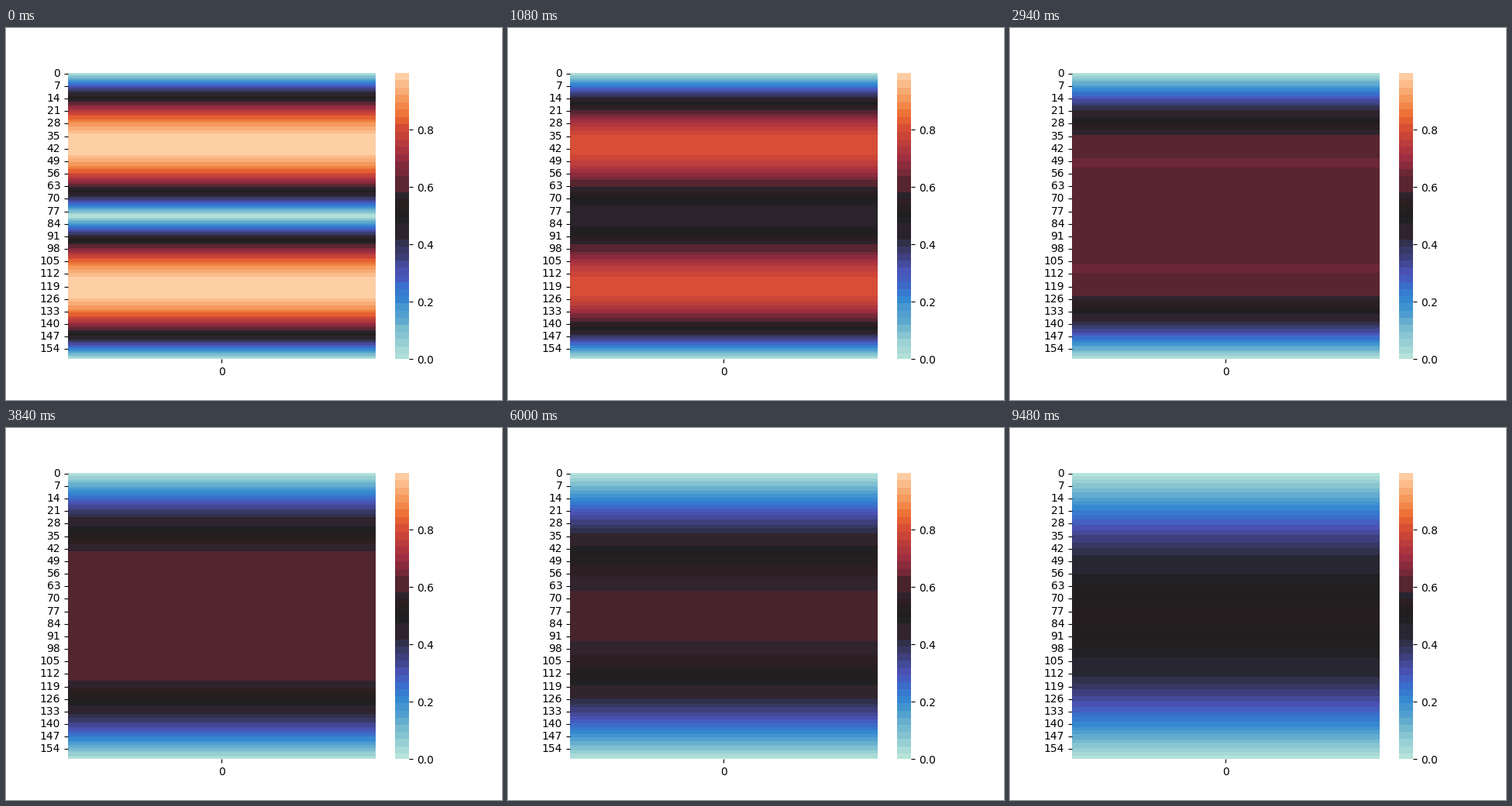
Animation of 640 by 480 pixels, one loop 9600 ms. Source, as a matplotlib script:

```python
import numpy as np
import matplotlib.pyplot as plt
from matplotlib.animation import FuncAnimation
from matplotlib.colors import BoundaryNorm, LinearSegmentedColormap, ListedColormap

CELLS, FRAMES, INTERVAL = 160, 160, 60
SUBSTEPS, RATE = 16, 0.486
ROW_WEIGHT = 50  # pixels of one heatmap row per pixel row of the bar

ICE_FIRE = LinearSegmentedColormap.from_list("ice_fire", [
    (0, "#bde7db"), (0.1, "#7abccf"), (0.2, "#348bd0"), (0.25, "#3871cf"),
    (0.3, "#4b53b7"), (0.4, "#333250"), (0.45, "#25252e"), (0.5, "#1f1e1e"),
    (0.55, "#2b1f22"), (0.6, "#4d242e"), (0.7, "#9c2d42"), (0.8, "#d54a36"),
    (0.85, "#ec6c30"), (0.9, "#f49354"), (1, "#ffd4ac")], N=1024)

# Even bands on the cold side, in the dark middle and on the hot side
EDGES = np.concatenate([[0], np.linspace(0.02, 0.418, 17),
                        np.linspace(0.474, 0.582, 6), np.linspace(0.638, 1, 15)])
BANDS = len(EDGES) - 1
MIDS = (EDGES[:-1] + EDGES[1:]) / 2


def band(values):
    return np.digitize(values, EDGES[1:-1])


# These two dark bands share one colour
COLD_DARK, HOT_DARK = band(0.45), band(0.57)


def palette(u):
    """Give each band the mean colour of the pixels that fall in it."""
    bar_values = np.linspace(0, 1, 370)
    values = np.concatenate([u, bar_values])
    weights = np.repeat([ROW_WEIGHT, 1], [len(u), len(bar_values)])
    index = band(values)
    index[index == HOT_DARK] = COLD_DARK
    rgb = ICE_FIRE(values)[:, :3]
    sums = [np.bincount(index, weights * channel, BANDS) for channel in rgb.T]
    counts = np.bincount(index, weights, BANDS)
    colours = np.transpose(sums) / np.maximum(counts, 1)[:, None]
    colours[HOT_DARK] = colours[COLD_DARK]
    return ListedColormap(np.clip(colours, 0, 1))


def diffuse():
    """Heat equation on a rod whose ends are held at zero."""
    x = (np.arange(CELLS) + 0.5) / CELLS
    u = np.abs(np.sin(2 * np.pi * x))
    history = [u]
    for _ in range(FRAMES - 1):
        for _ in range(SUBSTEPS):
            padded = np.concatenate([-u[:1], u, -u[-1:]])
            u = u + RATE * np.diff(padded, 2)
        history.append(u)
    return history


def bare_axes(rect):
    ax = fig.add_axes(rect)
    ax.spines[:].set_visible(False)
    return ax


history = diffuse()
norm = BoundaryNorm(EDGES, BANDS)

fig = plt.figure(figsize=(6.4, 4.8), dpi=100)
ax = bare_axes([0.125, 0.11, 0.62, 0.77])
heat = ax.pcolormesh(history[0][:, None], norm=norm)
ax.set_ylim(CELLS, 0)
rows = np.arange(0, CELLS, 7)
ax.set_yticks(rows + 0.5, rows, va="center")
ax.set_xticks([0.5], ["0"])

bar_ax = bare_axes([0.78375, 0.11, 0.028875, 0.77])
bar = bar_ax.pcolormesh([0, 1], EDGES, MIDS[:, None], norm=norm)
bar_ax.set_ylim(0, history[0].max())
bar_ax.set_xticks([])
bar_ax.yaxis.tick_right()
bar_ax.set_yticks(np.arange(5) / 5)


def update(frame):
    u = history[frame]
    cmap = palette(u)
    heat.set_array(u[:, None])
    heat.set_cmap(cmap)
    bar.set_cmap(cmap)
    return heat, bar


anim = FuncAnimation(fig, update, frames=FRAMES, interval=INTERVAL,
                     repeat=True, repeat_delay=0)
plt.show()
```
